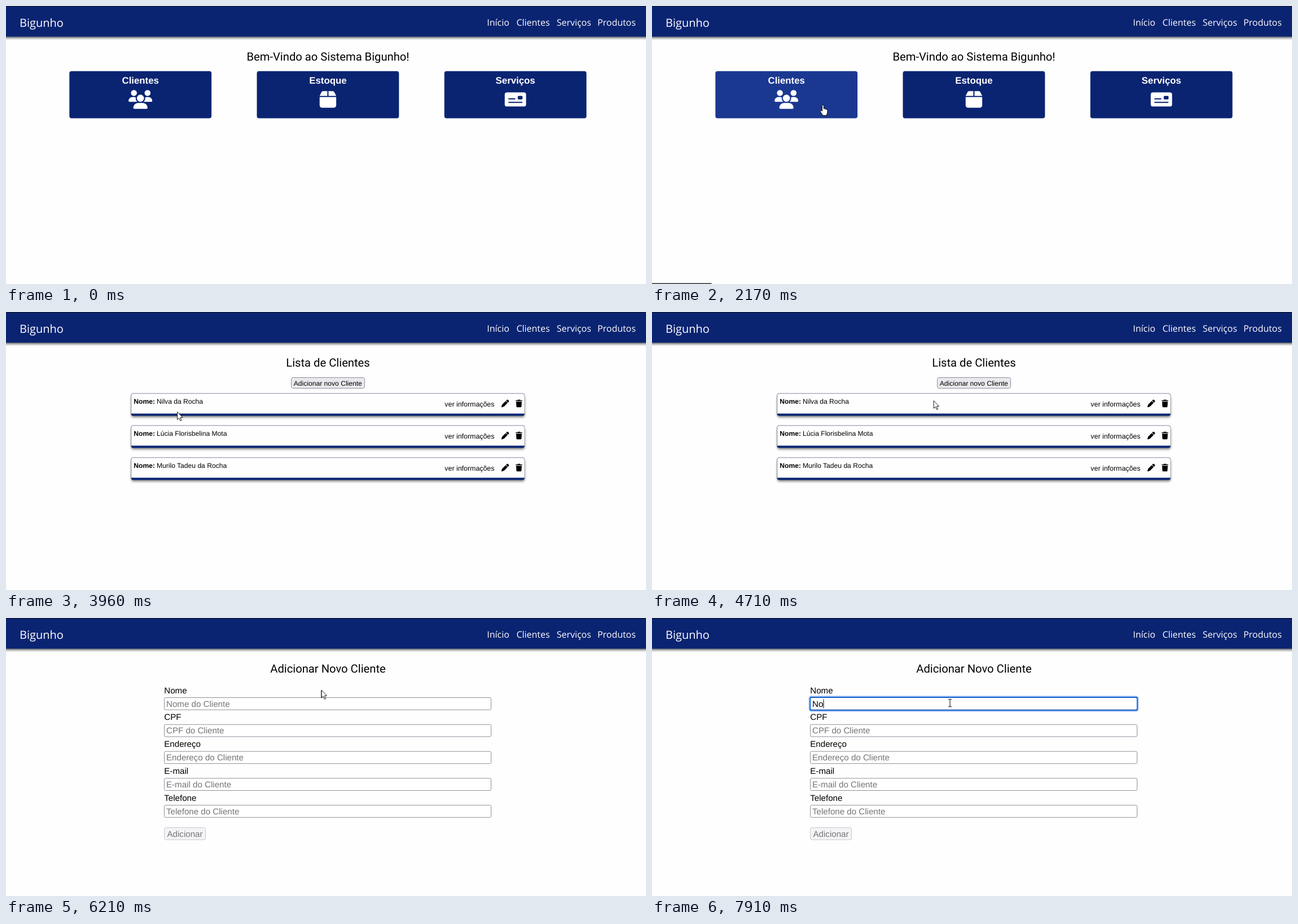
Write an HTML page that moves like this. It is 1134x494 px and loops after 8000 ms.

```html
<!DOCTYPE html>
<html lang="pt-BR">
<head>
<meta charset="utf-8">
<title>Bigunho</title>
<style>
html, body { margin: 0; width: 100%; height: 100%; overflow: hidden; background: #fefefe; }
svg { display: block; width: 1134px; height: 494px; text-rendering: geometricPrecision; }
text { font-family: "Liberation Sans", Arial, sans-serif; white-space: pre; }
.nav text { font: 15.95px "Open Sans", sans-serif; fill: #fff; }
.nav .brand { font-size: 20px; }
.title { font: 20.2px Roboto, sans-serif; text-anchor: middle; }
.card { fill: #0a2472; }
.cardName { font-size: 16.8px; font-weight: bold; fill: #fff; text-anchor: middle; }
.icon { fill: #fff; }
.small { font-size: 12.1px; }
.field { font-size: 15.12px; }
.hint { fill: #757575; }
.box { fill: #fff; stroke: #8f8f9d; }

/* 1% = 80 ms */
.anim { animation: 8s step-end infinite; }
#home { animation-name: home; }
#list { animation-name: list; }
#rows { animation-name: rows; }
#form { animation-name: form; }
#status { animation-name: status; }
#card0 { animation-name: cardHover; }
#add { animation-name: addButton; }
#box0 { animation-name: boxHover; }
#focus { animation-name: focus; }
#hint0 { animation-name: hint; }
#typed1 { animation-name: typed1; }
#typed2 { animation-name: typed2; }
#caret { animation-name: caret; }
#pointer { animation-name: move; }
#arrow { animation-name: arrow; }
#hand { animation-name: hand; }
#beam { animation-name: beam; }
#click { animation-name: click; }

@keyframes home { 0% { opacity: 1 } 38.625%, 100% { opacity: 0 } }
@keyframes list { 0% { opacity: 0 } 38.625% { opacity: 1 } 77.625%, 100% { opacity: 0 } }
@keyframes rows { 0% { opacity: 0 } 41.25%, 100% { opacity: 1 } }
@keyframes form { 0% { opacity: 0 } 77.625%, 100% { opacity: 1 } }
@keyframes status {
  0% { opacity: 0 } 26.25% { opacity: .5 } 27.125% { opacity: 1 }
  40.375% { opacity: .7 } 41.25% { opacity: .4 } 43.625%, 100% { opacity: 0 }
}
@keyframes cardHover {
  0% { fill: #0a2472 }
  22.875% { fill: #0e2979; animation-timing-function: steps(4) }
  26.25%, 100% { fill: #1b3891 }
}
@keyframes addButton {
  0% { fill: #e9e9ed } 68.125% { fill: #d0d0d7 } 72.375%, 100% { fill: #b1b1b9 }
}
@keyframes boxHover { 0% { stroke: #8f8f9d } 85.656%, 100% { stroke: #676774 } }
@keyframes focus { 0% { opacity: 0 } 89%, 100% { opacity: 1 } }
@keyframes hint { 0% { opacity: 1 } 97.25%, 100% { opacity: 0 } }
@keyframes typed1 { 0% { opacity: 0 } 97.25% { opacity: 1 } 98.875%, 100% { opacity: 0 } }
@keyframes typed2 { 0% { opacity: 0 } 98.875%, 100% { opacity: 1 } }
@keyframes caret {
  0% { opacity: 0; transform: none }
  89% { opacity: 1; transform: none }
  95.625% { opacity: 0; transform: none }
  97.25% { opacity: 1; transform: translateX(11px) }
  98.875%, 100% { opacity: 1; transform: translateX(19.5px) }
}
@keyframes move {
  0% { transform: translate(1032px, 520px) }
  5% { transform: translate(1032px, 482px) }
  5.875% { transform: translate(880px, 430px) }
  6.75% { transform: translate(740px, 385px) }
  7.625% { transform: translate(620px, 350px) }
  8.375% { transform: translate(545px, 331px) }
  9.25% { transform: translate(506px, 322px) }
  16.75% { transform: translate(497px, 316px) }
  17.625% { transform: translate(470px, 298px) }
  18.5% { transform: translate(430px, 270px) }
  19.375% { transform: translate(390px, 244px) }
  20.25% { transform: translate(356px, 222px) }
  21.125% { transform: translate(335px, 207px) }
  22% { transform: translate(324px, 200px) }
  22.875% { transform: translate(314px, 193px) }
  24.5% { transform: translate(305px, 182px) }
  26.25% { transform: translate(301px, 175px) }
  49.5% { transform: translate(303px, 177px); animation-timing-function: steps(4) }
  53% { transform: translate(350px, 183px); animation-timing-function: steps(4) }
  56.375% { transform: translate(450px, 172px); animation-timing-function: steps(3) }
  58.875% { transform: translate(498.5px, 157px) }
  65.5% { transform: translate(503px, 154px); animation-timing-function: steps(4) }
  69% { transform: translate(558.5px, 127.5px) }
  83.125% { transform: translate(554px, 131px); animation-timing-function: steps(4) }
  86.5%, 100% { transform: translate(526px, 150px) }
}
@keyframes arrow {
  0% { opacity: 1 } 22.875% { opacity: 0 } 38.625% { opacity: 1 } 85.656%, 100% { opacity: 0 }
}
@keyframes hand { 0% { opacity: 0 } 22.875% { opacity: 1 } 38.625%, 100% { opacity: 0 } }
@keyframes beam { 0% { opacity: 0 } 85.656%, 100% { opacity: 1 } }
@keyframes click {
  0% { opacity: 0 } 36.125% { opacity: 1 } 38.625% { opacity: 0 }
  72.375% { opacity: 1 } 74.875% { opacity: 0 }
  89% { opacity: 1 } 91.5%, 100% { opacity: 0 }
}
</style>
</head>
<body>
<svg viewBox="0 0 1134 494">
  <defs>
    <filter id="soft" x="-5%" y="-50%" width="110%" height="200%"><feGaussianBlur stdDeviation="2"/></filter>
    <g id="people">
      <circle cx="144" cy="80" r="80"/><circle cx="512" cy="80" r="80"/><circle cx="320" cy="224" r="96"/>
      <path d="M0 299C0 240 48 192 107 192h42q24 0 45 10-2 11-2 22c0 38 17 72 43 96H21Q0 320 0 299z
        M405 320c27-24 43-58 43-96q0-11-2-22 21-10 45-10h42c59 0 107 48 107 107q0 21-21 21z
        M128 485c0-73 60-133 133-133h118c73 0 133 60 133 133q0 27-27 27H155q-27 0-27-27z"/>
    </g>
    <path id="package" d="M51 58 0 160H208V32H94Q64 32 51 58zM240 160H448L397 58Q384 32 354 32H240z
      M448 192H0V416a64 64 0 0 0 64 64H384a64 64 0 0 0 64-64z"/>
    <g id="ticket">
      <rect y="64" width="576" height="384" rx="60"/>
      <g class="card">
        <rect x="352" y="160" width="128" height="96" rx="24"/>
        <rect x="96" y="226" width="192" height="30" rx="15"/>
        <rect x="96" y="322" width="384" height="30" rx="15"/>
      </g>
    </g>
    <path id="pencil" d="M410 231 422 220 292 90 258 124 59 323Q43 339 36 360L1 481c-5 18 12 35 30 30l120-36q21-6 37-22z
      M363 19 314 67 445 198 493 149c25-25 25-65 0-90L453 19c-25-25-65-25-90 0z"/>
    <path id="trash" d="M135 18 128 32H32a32 32 0 0 0 0 64H416a32 32 0 0 0 0-64H320L313 18Q304 0 284 0H164Q144 0 135 18z
      M416 128H32L53 467q3 45 48 45H347q45 0 48-45z"/>
  </defs>

  <rect width="1134" height="494" fill="#fefefe"/>
  <rect x="-10" y="4" width="1154" height="53" fill="#000" opacity=".6" filter="url(#soft)"/>
  <rect width="1134" height="54.5" fill="#0a2472"/>
  <rect width="1134" height="1" fill="#0b0d18"/>
  <g class="nav">
    <text class="brand" x="24" y="37">Bigunho</text>
    <text x="852.3" y="35.3">Início</text>
    <text x="904.5" y="35.3">Clientes</text>
    <text x="975.8" y="35.3">Serviços</text>
    <text x="1048" y="35.3">Produtos</text>
  </g>

  <g id="home" class="anim">
    <text class="title" x="570.5" y="96.7">Bem-Vindo ao Sistema Bigunho!</text>
  </g>

  <g id="list" class="anim">
    <text class="title" x="570.5" y="96.7">Lista de Clientes</text>
    <rect id="add" class="anim" x="505.5" y="116.5" width="130" height="19" rx="3" fill="#e9e9ed" stroke="#8f8f9d"/>
    <text class="small" x="570.3" y="131" text-anchor="middle">Adicionar novo Cliente</text>
    <g id="rows" class="anim"></g>
  </g>

  <g id="form" class="anim">
    <text class="title" x="570.5" y="96.7">Adicionar Novo Cliente</text>
    <g id="fields"></g>
    <rect x="280.5" y="372.5" width="73" height="21.5" rx="3" fill="#f4f4f6" stroke="#c7c7ce"/>
    <text class="field hint" x="285.5" y="388.5">Adicionar</text>
    <g id="focus" class="anim" fill="none">
      <rect x="278.5" y="139.2" width="583" height="26.3" rx="3.5" stroke="#0060df" stroke-opacity=".3" stroke-width="2.4"/>
      <rect x="280.2" y="140.8" width="579.6" height="23" rx="2" stroke="#0a5bd9" stroke-width="1.8"/>
    </g>
    <text id="typed1" class="field anim" x="284" y="157.7">N</text>
    <text id="typed2" class="field anim" x="284" y="157.7">No</text>
    <rect id="caret" class="anim" x="284" y="144.5" width="1" height="16"/>
  </g>

  <rect id="status" class="anim" y="492.4" width="105.5" height="1.6" fill="#38383f"/>

  <g id="pointer" class="anim">
    <g fill="#fff" stroke="#000" stroke-width=".9" stroke-linejoin="round">
      <path id="arrow" class="anim" d="M.6.6V14.2L3.7 11.4 5.9 16.4 8 15.5 5.9 10.6H10z"/>
      <path id="hand" class="anim" d="M.5 11V2.3a1.4 1.4 0 0 1 2.8 0V7.5q1.5-.9 2.4.6 1.6-.7 2.2.8 2-.3 2 1.6V14q0 2-1.4 3.6v1.9H1V18Q-.8 15.5-2.6 12.8-3 10.8-1.2 10.7-.2 10.8.5 12z"/>
    </g>
    <path id="beam" class="anim" d="M-.8-5.5H1.2L2 -4.8 2.8-5.5H4.8M2-5V7M-.8 7.7H1.2L2 7 2.8 7.7H4.8" fill="none" stroke="#000"/>
    <circle id="click" class="anim" r="10" fill="#ff0" fill-opacity=".47"/>
  </g>
</svg>
<script>
const fill = (id, items, draw) =>
  document.getElementById(id).insertAdjacentHTML('beforeend', items.map(draw).join(''));
const icon = (name, x, y, scale) =>
  `<use href="#${name}" transform="translate(${x} ${y}) scale(${scale})"/>`;

fill('home', [['Clientes', 'people', 640], ['Estoque', 'package', 448], ['Serviços', 'ticket', 576]],
  ([label, name, width], i) => {
    const x = 112.3 + 332.2 * i, mid = x + 125.9, scale = .0656;
    return `<rect id="card${i}" class="card ${i ? '' : 'anim'}" x="${x}" y="115.8" width="251.8" height="83.7" rx="4"/>
      <text class="cardName" x="${mid}" y="138">${label}</text>
      <g class="icon">${icon(name, mid - width * scale / 2, 149.2, scale)}</g>`;
  });

fill('rows', ['Nilva da Rocha', 'Lúcia Florisbelina Mota', 'Murilo Tadeu da Rocha'],
  (name, i) => `<g transform="translate(0 ${57 * i})">
    <rect x="222" y="148" width="697" height="39" rx="4" opacity=".5" filter="url(#soft)"/>
    <rect x="221.5" y="144.5" width="697.5" height="40" rx="4" fill="#0a2472"/>
    <path d="M222 180.5V148.5q0-3.5 3.5-3.5H915q3.5 0 3.5 3.5v32z" fill="#fefefe"/>
    <path d="M222 180.5V148.5q0-3.5 3.5-3.5H915q3.5 0 3.5 3.5v32" fill="none" stroke="#c4c4c8"/>
    <text class="small" x="226.3" y="162.8" font-weight="bold">Nome:</text>
    <text class="small" x="267" y="162.8">${name}</text>
    <text x="777.3" y="167.7" font-size="12.4">ver informações</text>
    ${icon('pencil', 877.8, 155.8, .0262)}${icon('trash', 903, 155.8, .0262)}
  </g>`);

fill('fields', ['Nome', 'CPF', 'Endereço', 'E-mail', 'Telefone'],
  (label, i) => {
    const anim = i ? '' : 'anim';
    return `<g transform="translate(0 ${47.8 * i})">
      <text class="field" x="280.3" y="133.6">${label}</text>
      <rect id="box${i}" class="box ${anim}" x="280.5" y="141.5" width="579" height="21.6" rx="2"/>
      <text id="hint${i}" class="field hint ${anim}" x="284" y="157.7">${label} do Cliente</text>
    </g>`;
  });
</script>
</body>
</html>
```
